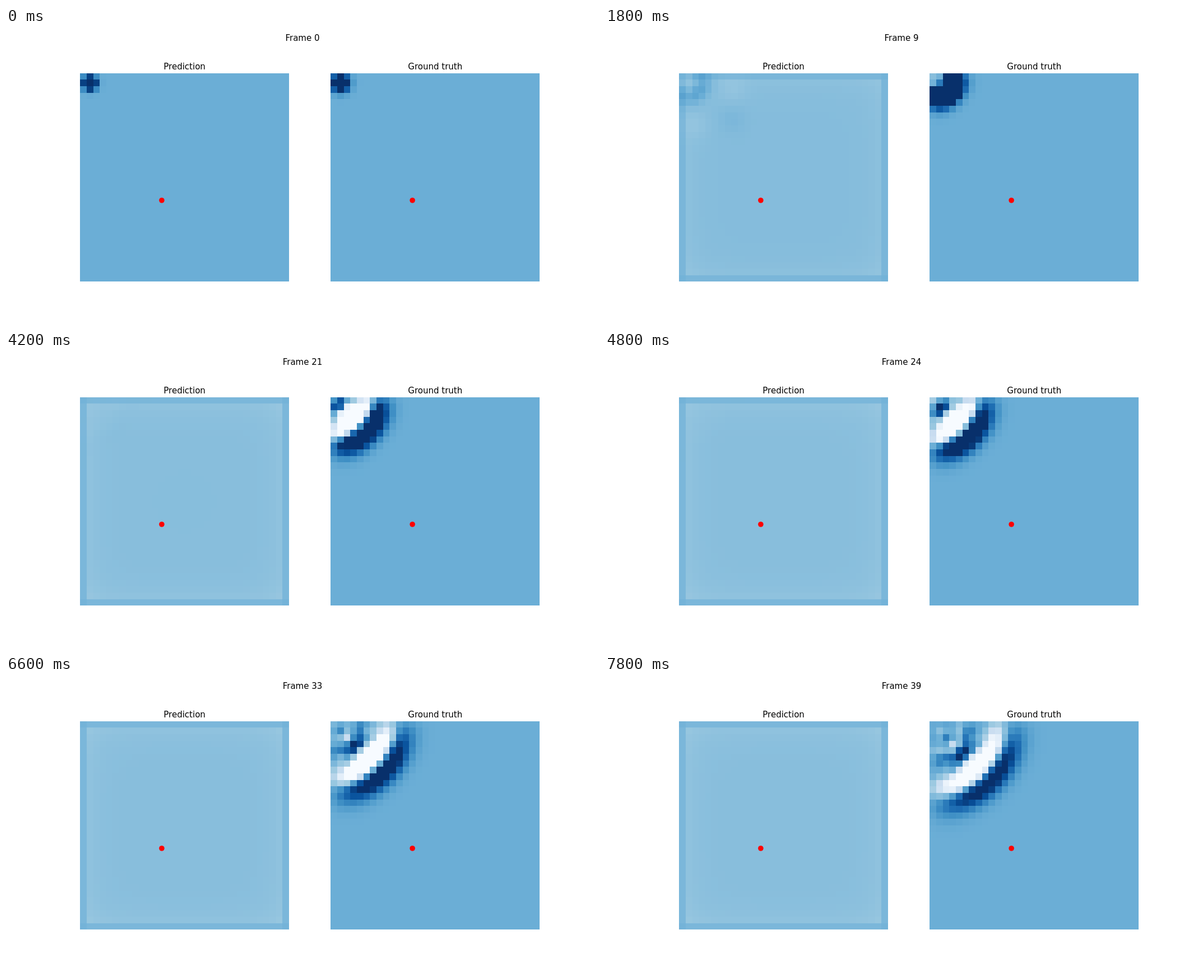
An HTML page with a canvas that plays this animation: 1058 by 529 pixels, repeating every 8000 ms.

```html
<!DOCTYPE html>
<html lang="en">
<head>
<meta charset="utf-8">
<title>Wave prediction</title>
<style>
  html, body { margin: 0; width: 100%; height: 100%; overflow: hidden; background: #fff; }
  canvas, svg { position: absolute; left: 0; top: 0; display: block; }
  text { font: 15px "DejaVu Sans", sans-serif; text-anchor: middle; fill: #000; }
</style>
</head>
<body>
<canvas id="fields" width="1058" height="529"></canvas>
<svg width="1058" height="529" viewBox="0 0 1058 529">
  <text id="title" x="529" y="23">Frame 0</text>
  <text x="318.6" y="73.5">Prediction</text>
  <text x="765.8" y="73.5">Ground truth</text>
  <circle cx="277.9" cy="308" r="4.8" fill="#f00"/>
  <circle cx="725.1" cy="308" r="4.8" fill="#f00"/>
</svg>
<script>
const N = 32, W = N + 2, STEPS = 40, STEP_MS = 200;
const CELL = 372.7 / N, TOP = 80.75, LEFT = [132.25, 579.45];
const COURANT2 = 0.0915;

const ctx = document.getElementById('fields').getContext('2d');
const title = document.getElementById('title');

const BLUES = ['f7fbff', 'deebf7', 'c6dbef', '9ecae1', '6baed6', '4292c6', '2171b5', '08519c', '08306b']
  .map(h => [0, 2, 4].map(i => parseInt(h.slice(i, i + 2), 16)));

// Diverging value in -1..1 to a colour; larger is darker.
function colour(v) {
  const p = Math.min(1, Math.max(0, (v + 1) / 2)) * 8;
  const i = Math.min(7, Math.floor(p));
  return `rgb(${BLUES[i].map((a, k) => Math.round(a + (BLUES[i + 1][k] - a) * (p - i)))})`;
}

const at = (x, y) => (y + 1) * W + x + 1;
const bell = (x, y, cx, cy, k) => Math.exp(-k * ((x - cx) ** 2 + (y - cy) ** 2));

function eachCell(fn) {
  for (let y = 0; y < N; y++) for (let x = 0; x < N; x++) fn(x, y, at(x, y));
}

// Leapfrog wave equation with zero walls, started by a pulse at cell (1, 1).
function simulate(amp, k) {
  let prev = new Float64Array(W * W), cur = new Float64Array(W * W);
  eachCell((x, y, i) => { cur[i] = amp * bell(x, y, 1, 1, k); });
  const out = [cur];
  while (out.length < STEPS) {
    const next = new Float64Array(W * W);
    eachCell((x, y, i) => {
      const lap = cur[i - 1] + cur[i + 1] + cur[i - W] + cur[i + W] - 4 * cur[i];
      next[i] = 2 * cur[i] - prev[i] + COURANT2 * lap;
    });
    prev = cur;
    cur = next;
    out.push(cur);
  }
  return out;
}

// Resting state of the predictor: flat centre, paler rim, darker outline.
function rest(x, y) {
  const dx = Math.min(x, N - 1 - x), dy = Math.min(y, N - 1 - y);
  if (!dx && !dy) return -0.045;
  if (!dx || !dy) return -0.08;
  return -0.14 - 0.035 * (Math.exp((1 - dx) / 2.2) + Math.exp((1 - dy) / 2.2));
}

function ripple(x, y) {
  return 0.05 * (bell(x, y, 7.6, 6.6, 0.25)
    - bell(x, y, 7.7, 2, 0.22) - bell(x, y, 2, 7.5, 0.22));
}

const truth = simulate(2.5, 0.68);
const guess = simulate(2.65, 1.1).map((field, n) => {
  const out = new Float64Array(W * W);
  const fade = Math.exp(-n / 3.8), settle = 1 - Math.exp(-n / 4);
  const swell = Math.exp(-(((n - 9) / 3) ** 2));
  eachCell((x, y, i) => {
    out[i] = field[i] * fade + rest(x, y) * settle + ripple(x, y) * swell;
  });
  return out;
});

function drawField(field, left) {
  eachCell((x, y, i) => {
    const x0 = Math.round(left + x * CELL), x1 = Math.round(left + (x + 1) * CELL);
    const y0 = Math.round(TOP + y * CELL), y1 = Math.round(TOP + (y + 1) * CELL);
    ctx.fillStyle = colour(field[i]);
    ctx.fillRect(x0, y0, x1 - x0, y1 - y0);
  });
}

let shown = -1;
function show(n) {
  if (n === shown) return;
  shown = n;
  title.textContent = 'Frame ' + n;
  drawField(guess[n], LEFT[0]);
  drawField(truth[n], LEFT[1]);
}

const start = performance.now();
function tick() {
  show(Math.floor((performance.now() - start) / STEP_MS) % STEPS);
  requestAnimationFrame(tick);
}
show(0);
requestAnimationFrame(tick);
</script>
</body>
</html>
```
